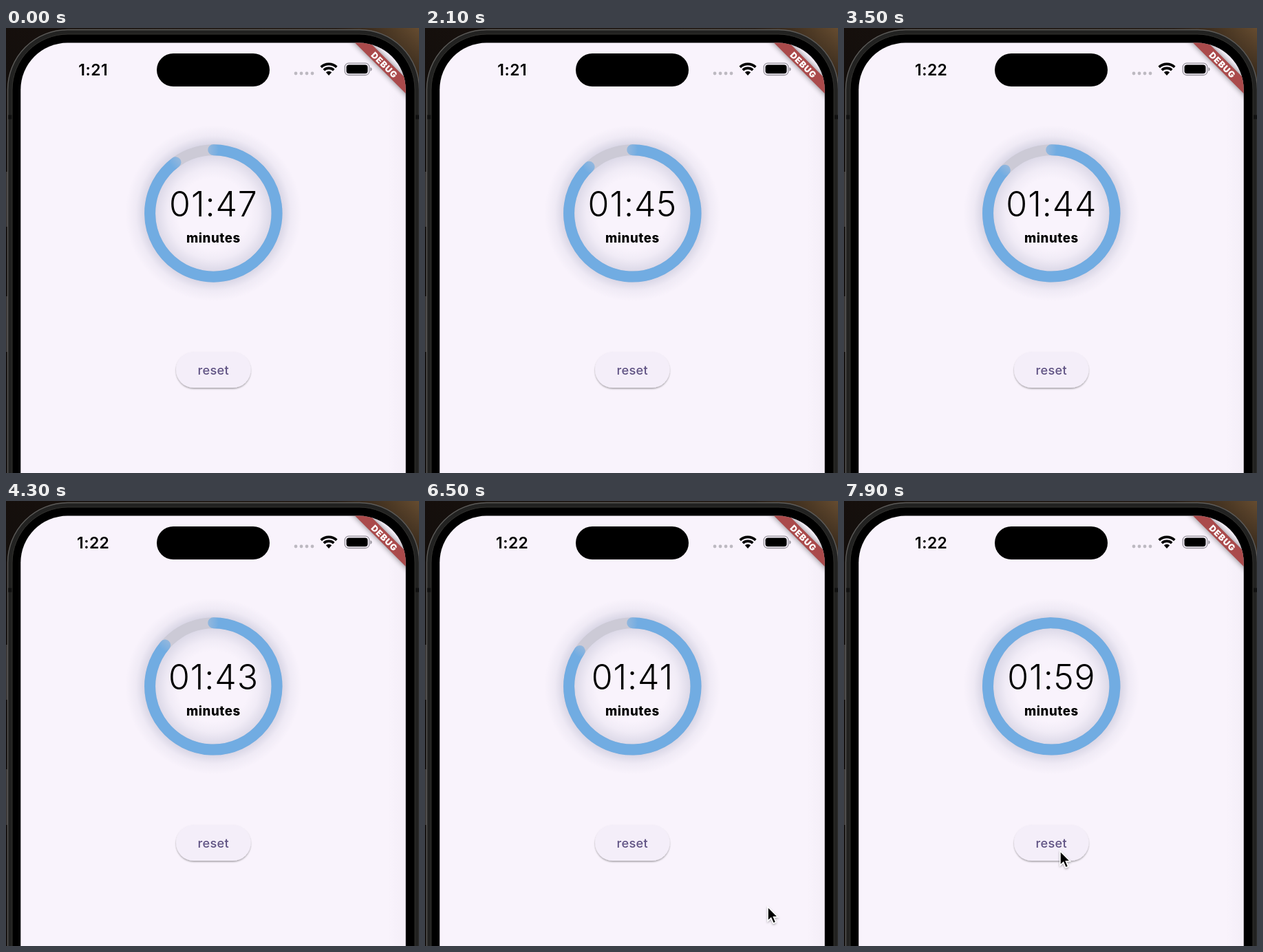
Animation, 600 px wide and 647 px high, one loop 8000 ms. Source, as an HTML page:

```html
<!DOCTYPE html>
<html lang="en">
<head>
<meta charset="utf-8">
<title>Countdown timer</title>
<style>
  html, body { margin: 0; width: 100%; height: 100%; overflow: hidden; background: #17120f; }
  svg { display: block; }
  text { font-family: Inter, Roboto, sans-serif; text-anchor: middle; }
</style>
</head>
<body>
<svg width="600" height="647" viewBox="0 0 600 647">
  <defs>
    <linearGradient id="room">
      <stop offset="0" stop-color="#150f0c"/>
      <stop offset=".8" stop-color="#241b15"/>
      <stop offset=".93" stop-color="#4e3a25"/>
      <stop offset="1" stop-color="#664c30"/>
    </linearGradient>
    <linearGradient id="fall" x2="0" y2="1">
      <stop offset="0" stop-color="#120e0c" stop-opacity="0"/>
      <stop offset=".2" stop-color="#120e0c"/>
    </linearGradient>
    <linearGradient id="edge">
      <stop offset="0" stop-color="#cfcad6" stop-opacity="0"/>
      <stop offset="1" stop-color="#cfcad6" stop-opacity=".12"/>
    </linearGradient>
    <radialGradient id="glow">
      <stop offset=".4" stop-color="#c3c2d6" stop-opacity="0"/>
      <stop offset=".52" stop-color="#c3c2d6" stop-opacity=".15"/>
      <stop offset=".64" stop-color="#c3c2d6" stop-opacity=".48"/>
      <stop offset=".72" stop-color="#c3c2d6" stop-opacity=".7"/>
      <stop offset=".79" stop-color="#c3c2d6" stop-opacity=".55"/>
      <stop offset=".88" stop-color="#c3c2d6" stop-opacity=".18"/>
      <stop offset="1" stop-color="#c3c2d6" stop-opacity="0"/>
    </radialGradient>
    <linearGradient id="fade">
      <stop offset="0" stop-color="#cccad6" stop-opacity=".38"/>
      <stop offset="1" stop-color="#cccad6" stop-opacity="0"/>
    </linearGradient>
    <filter id="soft" x="-20%" y="-80%" width="140%" height="260%"><feGaussianBlur stdDeviation="4"/></filter>
    <filter id="lift" x="-20%" y="-20%" width="140%" height="150%">
      <feDropShadow dx="0" dy="1.6" stdDeviation="1.1" flood-color="#000" flood-opacity=".34"/>
    </filter>
    <filter id="drop" x="-50%" y="-50%" width="200%" height="200%">
      <feDropShadow dx="0" dy="1.5" stdDeviation="1.5" flood-color="#000" flood-opacity=".35"/>
    </filter>
    <clipPath id="screen"><rect x="21.300" y="21.600" width="559.400" height="760" rx="68"/></clipPath>
    <clipPath id="pill"><rect x="247" y="471" width="108.500" height="52" rx="26"/></clipPath>
  </defs>

  <!-- surroundings and phone body -->
  <rect width="600" height="647" fill="url(#room)"/>
  <rect width="600" height="647" fill="url(#fall)"/>
  <path d="M1 209V289M1 390V471" stroke="#3a3836" stroke-width="2"/>
  <rect x="2.500" y="2.500" width="598" height="800" rx="87" fill="#222221" stroke="#5c5b59" stroke-width="1.400"/>
  <path d="M3 129.500H9M595 129.500H600" stroke="#111" stroke-width="6"/>
  <rect x="9" y="9" width="585" height="790" rx="81" fill="#000" stroke="#33322f"/>

  <g clip-path="url(#screen)">
    <rect x="21" y="21" width="560" height="626" fill="#f9f3fc"/>
    <rect x="555" y="21" width="26" height="626" fill="url(#edge)"/>
    <g transform="translate(581 22) rotate(45)">
      <rect x="-64" y="36.400" width="128" height="15.600" opacity=".5" filter="url(#soft)"/>
      <rect x="-64" y="36.400" width="128" height="15.600" fill="#aa4a4b"/>
      <text x=".4" y="49.200" font-size="12.600" font-weight="900" letter-spacing=".8" fill="#fff">DEBUG</text>
    </g>
  </g>

  <!-- status bar -->
  <text id="clock" x="126.700" y="68.700" font-size="23" font-weight="600" letter-spacing=".4"></text>
  <rect x="219" y="37" width="164" height="48" rx="24"/>
  <path d="M421 66h25" stroke="#bdb9c1" stroke-width="4.800" stroke-linecap="round" stroke-dasharray="0 8"/>
  <g id="wifi" fill="none" stroke="#000" stroke-width="3.600"></g>
  <rect x="492.200" y="51.200" width="35.600" height="17.300" rx="5.600" fill="none" stroke="#96929b" stroke-width="1.300"/>
  <rect x="494.500" y="53.500" width="31" height="12.700" rx="3.700"/>
  <path d="M529.300 57q2.400 .8 2.400 3t-2.400 3z" fill="#96929b"/>

  <!-- countdown, drawn around its own centre -->
  <g transform="translate(301.300 269.400)">
    <circle r="128" fill="url(#glow)"/>
    <g fill="none" stroke-width="16">
      <circle r="92.200" stroke="#cccad6"/>
      <path id="arc" stroke="#71ace2" stroke-linecap="round"/>
    </g>
    <g id="tips">
      <circle cy="-92.200" r="8.100" fill="url(#fade)"/>
      <g id="end"><circle cy="-92.200" r="8.100" fill="url(#fade)" transform="scale(-1 1)"/></g>
    </g>
  </g>
  <text id="count" x="301.400" y="274" font-size="50" font-weight="300" letter-spacing=".9"></text>
  <text x="301.300" y="312" font-size="18.600" font-weight="800" letter-spacing=".55">minutes</text>

  <!-- button -->
  <rect x="247" y="471" width="108.500" height="52" rx="26" fill="#f4eef9" filter="url(#lift)"/>
  <g clip-path="url(#pill)" fill="#5e5a78">
    <rect id="wash" x="247" y="471" width="109" height="52"/>
    <circle id="ripple" cx="315" cy="511"/>
  </g>
  <text x="301.200" y="503.500" font-size="18.200" font-weight="500" letter-spacing=".3" fill="#5f5283">reset</text>

  <path id="cursor" d="M0 0V20.500L4.700 16.200L8.100 24L11.700 22.400L8.400 14.800H14.600Z" stroke="#fff" stroke-width="1.500" filter="url(#drop)"/>
</svg>
<script>
  const LOOP = 8000, STEP = 100, TOTAL = 120000, LEFT = 107800;
  const RESET = 7400, MINUTE = 2300, SHOW = 6200, PRESS = 7100;
  const $ = id => document.getElementById(id);
  const set = (id, attrs) => { for (const k in attrs) $(id).setAttribute(k, attrs[k]); };
  const ramp = (t, a, b) => Math.min(1, Math.max(0, (t - a) / (b - a)));
  const ease = p => p * p * (3 - 2 * p);

  // Point at a clockwise angle in degrees from the top
  function polar(cx, cy, r, deg) {
    const a = deg * Math.PI / 180;
    return `${(cx + r * Math.sin(a)).toFixed(2)} ${(cy - r * Math.cos(a)).toFixed(2)}`;
  }
  function arc(cx, cy, r, from, to) {
    const large = to - from > 180 ? 1 : 0;
    return `M${polar(cx, cy, r, from)}A${r} ${r} 0 ${large} 1 ${polar(cx, cy, r, to)}`;
  }

  $('wifi').innerHTML =
    [16.6, 10.6].map(r => `<path d="${arc(469, 69, r, -43, 43)}"/>`).join('') +
    `<path d="${arc(469, 69, 6.2, -42, 42)}L469 69Z" fill="#000" stroke="none"/>`;

  function drawTimer(t) {
    const left = t < RESET ? LEFT - t : TOTAL - 1 - (t - RESET);
    const sweep = 360 * left / TOTAL;
    const sec = Math.floor(left / 1000);
    const two = n => String(n).padStart(2, '0');
    $('count').textContent = two(Math.floor(sec / 60)) + ':' + two(sec % 60);
    set('arc', { d: arc(0, 0, 92.2, 0, sweep) });
    set('end', { transform: `rotate(${sweep})` });
    set('tips', { visibility: sweep > 350 ? 'hidden' : 'visible' });
  }

  function drawPointer(t) {
    const p = ease(ramp(t, 6500, 7000));
    set('cursor', {
      transform: `translate(${498 - 184 * p} ${590 - 81 * p})`,
      visibility: t < SHOW ? 'hidden' : 'visible'
    });
    const on = t >= PRESS ? 1 - ramp(t, 7300, 7700) : 0;
    set('wash', { opacity: 0.04 * on });
    set('ripple', { opacity: 0.07 * on, r: 12 + 7 * ramp(t, PRESS, 7200) + 70 * ramp(t, 7200, 7500) });
  }

  function draw(now) {
    const t = Math.floor(now % LOOP / STEP) * STEP;
    $('clock').textContent = t < MINUTE ? '1:21' : '1:22';
    drawTimer(t);
    drawPointer(t);
  }

  const start = performance.now();
  function tick() {
    draw(performance.now() - start);
    requestAnimationFrame(tick);
  }
  tick();
</script>
</body>
</html>
```
